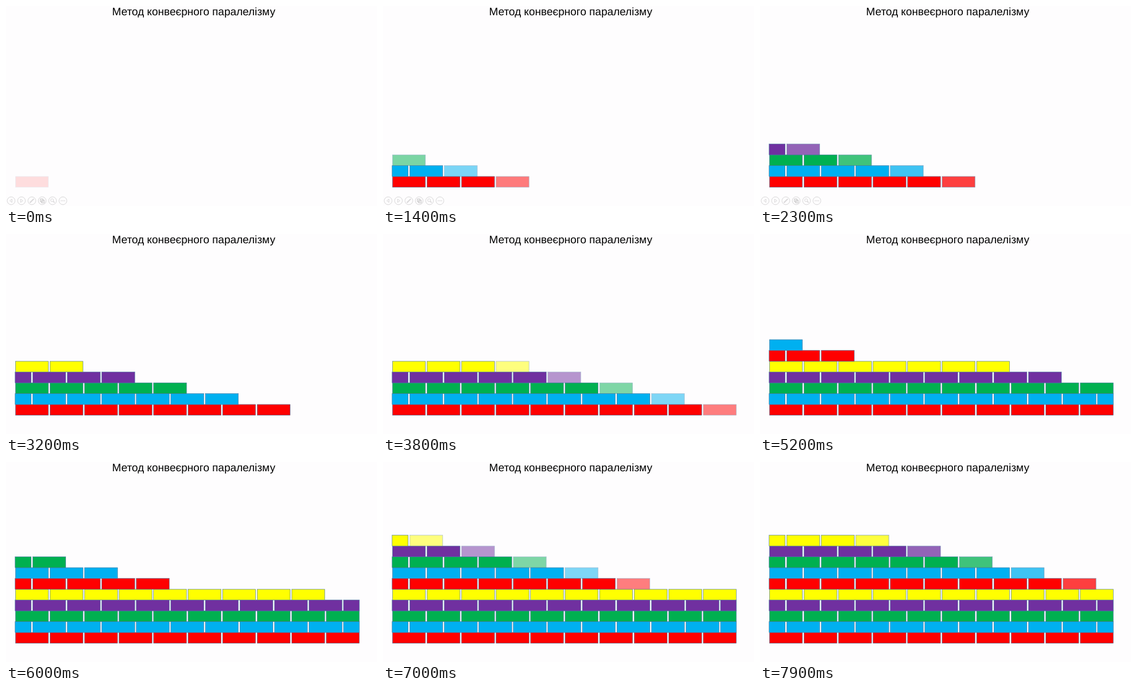
Recreate the animation shown at these times as an HTML page. Size 600x324 px, loop 8000 ms.

```html
<!DOCTYPE html>
<html lang="uk">
<head>
<meta charset="utf-8">
<style>
  html, body { margin: 0; width: 100%; height: 100%; overflow: hidden; background: #fefdfe; }
  svg { display: block; }
  text { font: 17.64px "Liberation Sans", Arial, sans-serif; text-anchor: middle; }
  #bricks { stroke: #41719c; stroke-width: .6; }
  #controls { fill: none; stroke: #dad9da; stroke-width: 1; }
</style>
</head>
<body>
<svg width="600" height="324" viewBox="0 0 600 324">
  <text x="303.5" y="14.5" text-rendering="geometricPrecision">Метод конвеєрного паралелізму</text>
  <g id="bricks"></g>
  <g id="controls">
    <path d="M9.7 312.8v5.4l-3.6-2.7z M23.7 312.8v5.4l3.6-2.7z"/>
    <path d="M38.6 318.8l6.4-6.4" stroke-width="2"/>
    <path d="M55.5 312.5h4.5v4.5h-4.5z M57.5 314.5h4.5v4.5h-4.5z" stroke="#c9c8c9"/>
    <path d="M76.3 316.3l2.3 2.3" stroke-width="1.6"/>
    <circle cx="74.6" cy="314.6" r="2.3"/>
    <path d="M88.6 315.5h7" stroke-width="1.5" stroke-dasharray="1.6 1"/>
  </g>
</svg>
<script>
const NS = 'http://www.w3.org/2000/svg';
const LOOP = 8000, TICK = 100, STEP = 400, CONTROLS_HIDE = 3000;
const COLORS = ['#ff0000', '#00b0f0', '#00b050', '#7030a0', '#ffff00'];
const LEFT = 15.3, RIGHT = 571.4, PITCH = 55.85, WIDTH = 53.3, HEIGHT = 17.5, BASE = 276.1;

const brickLayer = document.getElementById('bricks');
const controls = document.getElementById('controls');

function add(parent, tag, attrs) {
  const el = document.createElementNS(NS, tag);
  for (const key in attrs) el.setAttribute(key, attrs[key]);
  return parent.appendChild(el);
}

for (let i = 0; i < 6; i++) {
  add(controls, 'circle', { cx: 8.3 + 16.75 * i, cy: 315.5, r: 6.3 });
}

// Each colour is one worker: it lays one brick per step and
// moves on to its next row when the current one is complete.
const nextFree = [0, 1, 3, 4, 6];
const bricks = [];
for (let row = 0; row < 10; row++) {
  const worker = row % 5;
  const half = row % 2;
  const count = 10 + half;
  for (let i = 0; i < count; i++) {
    const start = LEFT + PITCH * (i - half / 2);
    const x = Math.max(LEFT - half * .5, start);
    const end = Math.min(RIGHT, start + WIDTH);
    const el = add(brickLayer, 'rect', {
      x, y: BASE - HEIGHT * row, width: end - x, height: HEIGHT, fill: COLORS[worker]
    });
    bricks.push({ el, step: nextFree[worker] + i });
  }
  nextFree[worker] += count;
}

function render(time) {
  const t = Math.floor(time % LOOP / TICK) * TICK;
  const progress = t / STEP + .12 * Math.max(0, 1 - t / 1600);
  for (const { el, step } of bricks) {
    el.setAttribute('opacity', Math.min(1, Math.max(0, progress - step)));
  }
  controls.setAttribute('visibility', t < CONTROLS_HIDE ? 'visible' : 'hidden');
}

const origin = performance.now();
function frame() {
  render(performance.now() - origin);
  requestAnimationFrame(frame);
}
frame();
</script>
</body>
</html>
```
